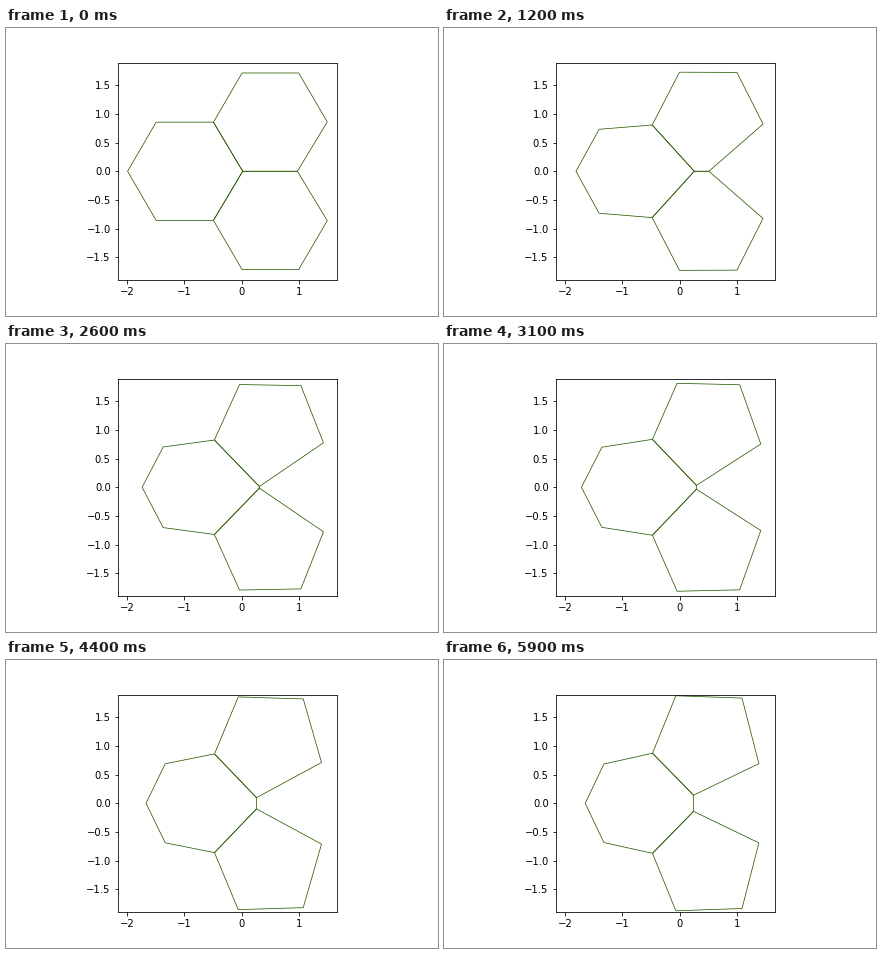
Animation of 432 by 288 pixels, one loop 6 s. Source, as a matplotlib script:

```python
import matplotlib.pyplot as plt
from matplotlib.animation import FuncAnimation
from matplotlib.patches import Polygon

FRAMES, INTERVAL = 60, 100
SWAP = 18  # the shared inner edge has shrunk to a point and turns upright
LAST = FRAMES - 1

# Vertex: start, place at the swap, end, and how early it moves before the swap.
# The lower half mirrors these.
VERTICES = {
    "left": ((-1.993, 0), (-1.783, 0), (-1.65, 0), 1.8),
    "shoulder": ((-1.495, .858), (-1.394, .713), (-1.324, .686), 1.8),
    "joint": ((-.494, .858), (-.479, .801), (-.475, .874), 1.8),
    "right": ((1.494, .863), (1.449, .818), (1.383, .692), 1.8),
    "top_right": ((.995, 1.717), (1.008, 1.745), (1.088, 1.838), .4),
    "top_left": ((.007, 1.717), (-.024, 1.755), (-.068, 1.878), .4),
    "inner_west": ((.017, 0), (.341, 0), (.242, 0), 1.2),
    "inner_east": ((.973, 0), (.341, 0), (.242, 0), 1.2),
}
GAP = .141  # half length of the upright edge at the end


def ease_out(s, power):
    return 1 - (1 - s) ** power


def place(t, start, swap, end, power):
    """Move to the swap point, then on to the end point."""
    if t < SWAP:
        a, b, s = start, swap, ease_out(t / SWAP, power)
    else:
        a, b, s = swap, end, ease_out((t - SWAP) / (LAST - SWAP), 1.8)
    return tuple(u + (v - u) * s for u, v in zip(a, b))


def mirror(points):
    return [(x, -y) for x, y in points]


def cells(t):
    """Outlines of the west, north and south cells."""
    p = {name: place(t, *path) for name, path in VERTICES.items()}
    inner = [p["inner_west"], p["inner_east"]]
    if t >= SWAP:
        s = (t - SWAP) / (LAST - SWAP)
        inner = [(p["inner_west"][0], GAP * s * s * (3 - 2 * s))]
    arc = [p["shoulder"], p["joint"], inner[0]]
    west = [p["left"]] + arc + mirror(arc[::-1])
    north = [p["joint"], *inner, p["right"], p["top_right"], p["top_left"]]
    return west, north, mirror(north)


fig = plt.figure(figsize=(6, 4), dpi=72)
fig.subplots_adjust(left=0.125, right=0.9, bottom=0.125, top=0.88)
ax = fig.add_subplot()
ax.set_aspect("equal")
ax.set_xlim(-2.167, 1.667)
ax.set_ylim(-1.899, 1.899)
ax.set_xticks([-2, -1, 0, 1])
ax.set_yticks([k / 2 for k in range(-3, 4)])

outlines = [ax.add_patch(Polygon(points, fill=False, edgecolor="#265a00", lw=0.75))
            for points in cells(0)]


def update(frame):
    for outline, points in zip(outlines, cells(frame)):
        outline.set_xy(points)
    return outlines


anim = FuncAnimation(fig, update, frames=FRAMES, interval=INTERVAL, repeat=True)
plt.show()
```
